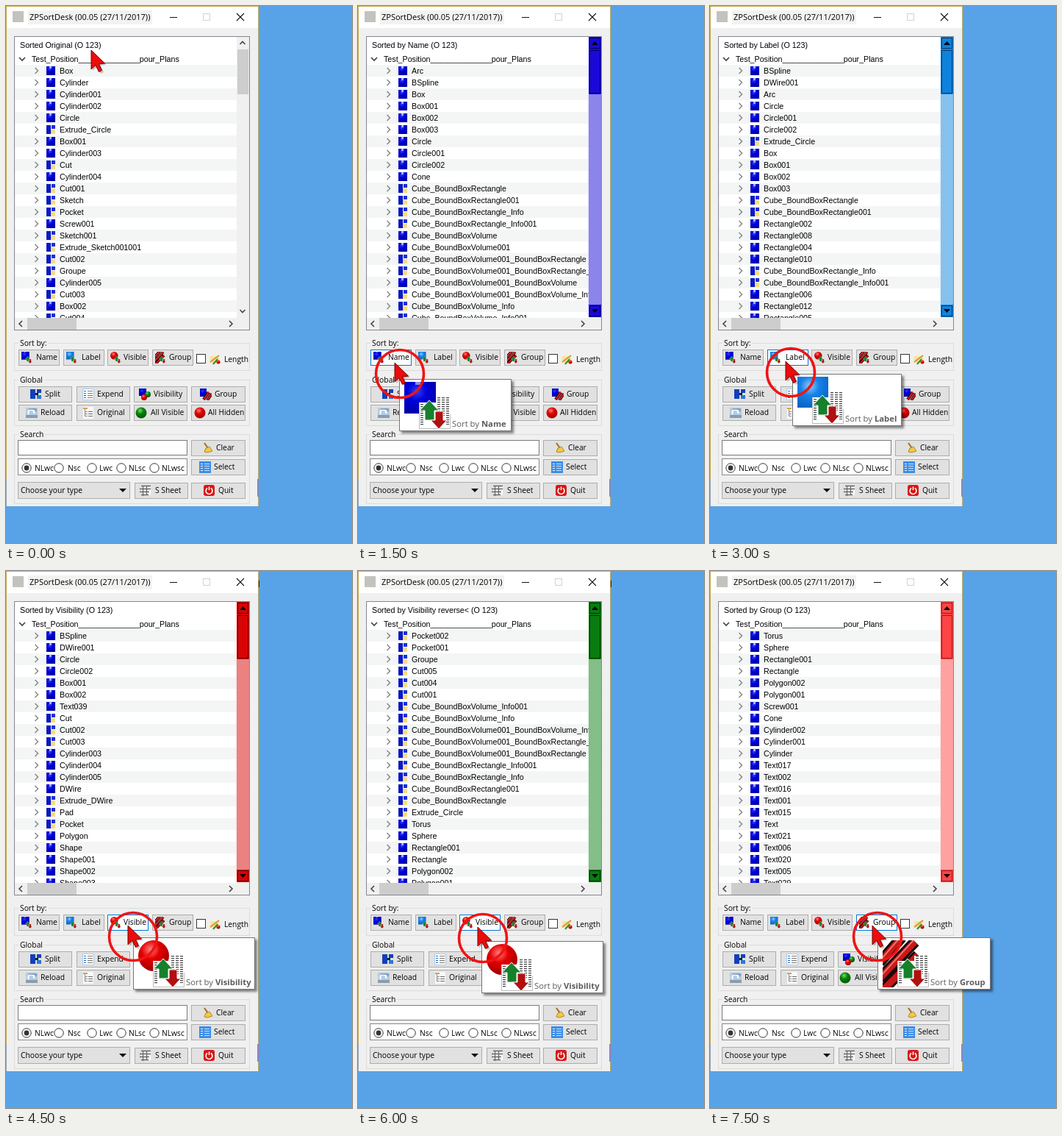
Animation, 471 px wide and 730 px high, one loop 8000 ms. Source, as an HTML page:

```html
<!DOCTYPE html>
<html lang="en">
<head>
<meta charset="utf-8">
<title>Sorting a tree</title>
<style>
html, body { margin: 0; width: 100%; height: 100%; overflow: hidden; background: #58a3e7; }
#stage { position: relative; width: 471px; height: 730px; overflow: hidden; }
#stage div, #stage span, #stage svg { position: absolute; box-sizing: border-box; }
span { white-space: pre; line-height: 16px; color: #000; font: 10.3px/16px "Open Sans", sans-serif; }
span.row { font: 10.7px/16px "Liberation Sans", Arial, sans-serif; }
span.title { font-size: 11px; }
span.legend { background: #eff0ef; padding: 0 2px; margin-left: -2px; }
span.tip { font-size: 11.3px; color: #5c5c5c; }
.scene { inset: 0; visibility: hidden; }
.list { left: 12px; top: 42px; width: 302px; height: 382px; overflow: hidden; background: #fff; }
</style>
</head>
<body>
<div id="stage"></div>
<script>
const STEP = 1500, LOOP = 8000;

const box = (x, y, w, h, fill, border, extra = '') =>
  `<div style="left:${x}px;top:${y}px;width:${w}px;height:${h}px;background:${fill};${border ? `border:1px solid ${border};` : ''}${extra}"></div>`;
const text = (x, middle, str, kind = '') =>
  `<span class="${kind}" style="left:${x}px;top:${middle - 8}px">${str}</span>`;
const svg = (x, y, w, h, body, view = `0 0 ${w} ${h}`) =>
  `<svg style="left:${x}px;top:${y}px" width="${w}" height="${h}" viewBox="${view}">${body}</svg>`;
const rect = (x, y, w, h, fill) => `<rect x="${x}" y="${y}" width="${w}" height="${h}" fill="${fill}"/>`;
const path = (d, stroke, width = 1, fill = 'none') =>
  `<path d="${d}" fill="${fill}" stroke="${stroke}" stroke-width="${width}"/>`;
const ball = (x, y, r, fill) => `<circle cx="${x}" cy="${y}" r="${r}" fill="url(#${fill})"/>`;
const lines = (x, y, w, count, gap, color) =>
  path(Array.from({ length: count }, (_, i) => `M${x} ${y + i * gap}h${w}`).join(''), color);

const radial = (id, light, main, dark) =>
  `<radialGradient id="${id}" cx=".4" cy=".3" r=".75"><stop stop-color="${light}"/><stop offset=".4" stop-color="${main}"/><stop offset="1" stop-color="${dark}"/></radialGradient>`;
const gradients = svg(0, 0, 1, 1, '<defs>' +
  radial('blue', '#3040f0', '#0000dc', '#0000a0') +
  radial('sky', '#90ccff', '#1683e8', '#0860c0') +
  radial('red', '#ff8080', '#e40000', '#960000') +
  radial('green', '#70e070', '#088408', '#045004') + '</defs>');

// 64-unit emblems shared by buttons and tooltips
const chain = rect(0, 0, 44, 64, '#fff') +
  path('M-4 30L26 -4M-4 52L44 2M0 68L48 20', '#1c0808', 15) +
  path('M-4 30L26 -4M-4 52L44 2M0 68L48 20', '#c81818', 9) +
  path('M-4 28L24 -4M-4 50L42 0', '#f07070', 2);
const emblems = {
  cube: rect(0, 0, 43, 43, 'url(#blue)') + rect(15, 0, 7, 4, '#8890f4'),
  label: rect(0, 0, 42, 42, 'url(#sky)'),
  ball: ball(21, 21, 21, 'red'),
  chain,
};
const sortEmblem = (kind, x, y, size) => {
  const sheet = size > 20
    ? rect(20, 28, 43, 36, '#fff') + rect(43, 21, 19, 36, '#fff') +
      path('M20.5 28.5V63.5H62.5V44', '#bbb') +
      '<path d="M47 21V46M53 21V46M59 21V58M24 30V60" stroke="#444" stroke-width="4" stroke-dasharray="1.2 1.8" fill="none"/>'
    : '';
  const up = 'M34 25L47 39H41V52H28V39H21Z', down = 'M47 64L58 52H53V40H42V52H36Z';
  return svg(x, y, size, size,
    emblems[kind] + sheet + path(up, '#fff', 1, '#16802c') + path(down, '#fff', 1, '#b01010'), '0 0 64 64');
};

// 16-unit button icons
const tree = (mark) => rect(1, 0, 14, 16, '#fafafa') + rect(1, 1, 6, 2, mark) +
  path('M3.5 3V13M3.5 6.5H7M3.5 9.5H7M3.5 12.5H7', '#888') + lines(8, 6.5, 6, 3, 3, '#666');
const icons = {
  split: rect(0, 1, 7, 13, '#1040b8') + rect(9, 1, 6, 5, '#1040b8') + rect(9, 9, 6, 5, '#2878d8') + rect(7, 6, 4, 3, '#123'),
  expend: rect(0, 0, 16, 16, '#fff') + path('M.5 .5H15.5V15.5H.5Z', '#a8c8e8') + lines(2, 3.5, 3, 4, 3, '#1868d0') + lines(7, 3.5, 7, 4, 3, '#777'),
  visibility: rect(0, 0, 10, 10, 'url(#blue)') + ball(12, 8, 4, 'green') + ball(7, 12, 4, 'red'),
  group: rect(0, 0, 9, 11, 'url(#blue)') + path('M5 15L12 5M10 16L16 7', '#300', 4) + path('M5 15L12 5M10 16L16 7', '#d82020', 2),
  reload: rect(0, 1, 16, 14, '#b4cbe0') + rect(0, 11, 16, 4, '#8a9cae') + path('M4 10A4 4 0 1 1 11 9', '#fff', 2) + path('M4 3H14V6', '#4a78a8'),
  original: tree('#d8a048'),
  shown: ball(8, 8, 7.5, 'green'),
  hidden: ball(8, 8, 7.5, 'red'),
  broom: path('M4 1L9 8', '#a06820', 2) + path('M6 8L11 6L15 12L8 14L4 13Z', '#b88820', 1, '#f0c848'),
  select: rect(0, 0, 16, 16, '#3a8ee8') + lines(2, 3.5, 3, 4, 3, '#fff') + lines(7, 3.5, 7, 4, 3, '#c8e4ff'),
  sheet: rect(2, 1, 13, 13, '#fff') + path('M2 1.5H15M0 5.5H15M0 9.5H13M2 13.5H12M4.5 1V15M9.5 1V14', '#666', 1.3),
  power: '<rect width="15" height="15" rx="3" fill="#d81818"/>' + path('M5 4.5A4.4 4.4 0 1 0 10 4.5M7.5 2.5V7', '#fff', 1.6),
  length: rect(1, 4, 12, 9, '#f4e4a0') + path('M1 12L13 3', '#d89828', 2) + path('M5 15L11 8', '#28903c', 2) + ball(12, 12, 2.5, 'red'),
};
const icon = (name, x, y) => svg(x, y, 16, 16, icons[name]);

const button = (x, y, w, h, label, textX, picture, hot) =>
  box(x, y, w, h, hot ? '#fcfdfe' : '#e1e1e1', hot ? '#0078d7' : '#adadad') + picture +
  text(textX, y + Math.floor(h / 2) - 1, label);
const sorters = [
  ['Name', 17, 41, 'cube'], ['Label', 78, 103, 'label'],
  ['Visible', 138, 160, 'ball'], ['Group', 199, 222, 'chain'],
];
const sortButton = ([label, x, textX, kind], hot) =>
  button(x, 467, 56, 22, label, textX, sortEmblem(kind, x + 4, 470, 16), hot);
const iconButton = ([label, x, y, textX, name, iconX]) =>
  button(x, y, x === 252 ? 74 : 73, 22, label, textX, icon(name, iconX, y + 3));
const frame = (y, h, label) => box(11, y, 321, h, 'none', '#dcdcdc') + text(19, y, label, 'legend');
const radio = ([label, x, textX], i) =>
  svg(x - 7, 621, 14, 14, '<circle cx="7" cy="7" r="6.2" fill="#fff" stroke="#333"/>' +
    (i ? '' : '<circle cx="7" cy="7" r="3.4" fill="#333"/>')) + text(textX, 628, label);

const windowLayer = () =>
  box(0, 0, 344, 680, '#eff0ef', '#d0ae58', 'border-bottom:0;') +
  box(0, 642, 1, 38, '#9aa4b4') + box(342, 643, 2, 24, '#8c88bc') +
  box(1, 1, 342, 29, '#fff') + box(30, 6, 169, 19, '#f2f2f1') +
  box(9, 7, 15, 15, '#c4c2bc') + text(32, 15, 'ZPSortDesk (00.05 (27/11/2017))', 'title') +
  box(223, 15, 10, 1, '#111') + box(268, 10, 10, 10, 'none', '#d2d2d2') +
  svg(313, 9, 12, 12, path('M1 1L11 11M11 1L1 11', '#111', 1.1)) +
  box(11, 41, 321, 400, '#f0f0f0', '#828790') +
  box(29, 424, 67, 16, '#cdcdcd') +
  svg(16, 427, 8, 10, path('M6 1L2 5L6 9', '#444', 1.6)) +
  svg(302, 427, 8, 10, path('M2 1L6 5L2 9', '#444', 1.6)) +
  frame(458, 38, 'Sort by:') + sorters.map(s => sortButton(s)).join('') +
  box(259, 473, 13, 13, '#fff', '#333') + icon('length', 277, 472) + text(297, 480, 'Length') +
  frame(508, 63, 'Global') + frame(582, 95, 'Search') +
  [
    ['Split', 17, 517, 53, 'split', 33], ['Expend', 96, 517, 124, 'expend', 104],
    ['Visibility', 174, 517, 201, 'visibility', 181], ['Group', 252, 517, 284, 'group', 264],
    ['Reload', 17, 542, 47, 'reload', 27], ['Original', 96, 542, 124, 'original', 104],
    ['All Visible', 174, 542, 197, 'shown', 176], ['All Hidden', 252, 542, 275, 'hidden', 256],
    ['Clear', 252, 590, 286, 'broom', 266], ['Select', 252, 616, 283, 'select', 263],
    ['S Sheet', 175, 648, 203, 'sheet', 182], ['Quit', 252, 648, 289, 'power', 269],
  ].map(iconButton).join('') +
  box(16, 590, 231, 21, '#fff', '#7a7a7a') + box(16, 615, 231, 23, '#fff', '#8a8a8a') +
  [['NLwc', 28, 39], ['Nsc', 72, 84], ['Lwc', 117, 127], ['NLsc', 157, 167], ['NLwsc', 202, 212]].map(radio).join('') +
  box(16, 647, 153, 23, '#e1e1e1', '#adadad') + text(20, 658, 'Choose your type') +
  svg(154, 656, 10, 5, path('M0 0H10L5 5Z', 'none', 0, '#111'));

const cubeIcon = rect(0, 0, 12, 12, 'url(#blue)') + rect(4, 0, 3, 3, '#9cacff');
const groupIcon = rect(0, 0, 12, 12, '#fff') + rect(0, 0, 6, 12, '#0818c8') + rect(7, 0, 5, 5, '#1830d8') + rect(6, 6, 6, 6, '#f6dc84');

// A leading * marks an item that contains others
const treeRow = (item, i) => {
  const middle = 46 + i * 16, grouped = item[0] === '*';
  return box(0, middle - 8, 302, 16, i % 2 ? '#fff' : '#f4f6f5') +
    svg(26, middle - 5, 8, 10, path('M1.5 1L5.5 5L1.5 9', '#888', 1.5)) +
    svg(43, middle - 6, 12, 12, grouped ? groupIcon : cubeIcon) +
    text(61, middle, grouped ? item.slice(1) : item, 'row');
};
const treeList = (heading, items) => `<div class="list">` +
  text(7, 11, heading, 'row') + svg(5, 26, 10, 8, path('M1 2L5 6L9 2', '#404040', 1.6)) +
  text(23, 30, 'Test_Position' + '_'.repeat(14) + 'pour_Plans', 'row') +
  items.split(' ').map(treeRow).join('') + '</div>';

const scrollbar = (color, edge) => {
  if (!color) return box(315, 59, 15, 61, '#cdcdcd') +
    svg(317, 46, 10, 8, path('M1.5 6L5 2.5L8.5 6', '#444', 1.6)) +
    svg(317, 411, 10, 8, path('M1.5 2L5 5.5L8.5 2', '#444', 1.6));
  const raised = (y, h) => box(314, y, 17, h, color, color, `box-shadow:inset 0 0 0 1px ${edge};`);
  const arrow = (y, d) => raised(y, 17) + svg(318, y + 6, 9, 5, path(d, 'none', 0, '#000'));
  return box(314, 42, 17, 381, `repeating-conic-gradient(${color} 0 25%,#fff 0 50%) 0 0/2px 2px`) +
    arrow(42, 'M0 5L4.5 0L9 5Z') + raised(59, 61) + arrow(406, 'M0 0L4.5 5L9 0Z');
};

const tooltip = (x, y, w, kind, word) =>
  box(x, y, w, 71, '#fff', '#767676', 'box-shadow:3px 3px 3px #0007;') +
  sortEmblem(kind, x + 7, y + 4, 64) + text(x + 72, y + 61, `Sort by <b>${word}</b>`, 'tip');
const ring = (x, y) => svg(x - 30, y - 22, 74, 74, '<circle cx="37" cy="37" r="32.5" fill="none" stroke="#f01414" stroke-width="3.6"/>');
const pointer = (x, y) => svg(x - 1, y - 1, 26, 36,
  path('M3 3V29L9 24L14 33L18 31L14 22L22 21Z', 'none', 0, '#0003') +
  path('M1 1V27L7 21.5L11.5 30.5L15.5 28.5L11.5 20L19.5 19Z', '#700', 1, '#ec0c0c'));

const scenes = [
  { heading: 'Original', tip: [116, 60],
    items: 'Box Cylinder Cylinder001 Cylinder002 Circle *Extrude_Circle Box001 Cylinder003 *Cut Cylinder004 *Cut001 *Sketch *Pocket Screw001 *Sketch001 *Extrude_Sketch001001 *Cut002 *Groupe Cylinder005 *Cut003 Box002 *Cut004' },
  { heading: 'by Name', tip: [50, 485], bar: ['#1a08d8', '#000060'], sorter: 0, hint: [56, 507, 153, 'cube', 'Name'],
    items: 'Arc BSpline Box Box001 Box002 Box003 Circle Circle001 Circle002 Cone *Cube_~Rectangle *Cube_~Rectangle001 *Cube_~Rectangle_Info *Cube_~Rectangle_Info001 Cube_~Volume Cube_~Volume001 *Cube_~Volume001_~Rectangle *Cube_~Volume001_~Rectangle_Info Cube_~Volume001_~Volume *Cube_~Volume001_~Volume_Info *Cube_~Volume_Info *Cube_~Volume_Info001' },
  { heading: 'by Label', tip: [103, 483], bar: ['#0e82dc', '#043c70'], sorter: 1, hint: [112, 500, 149, 'label', 'Label'],
    items: 'BSpline DWire001 Arc Circle Circle001 Circle002 *Extrude_Circle Box Box001 Box002 Box003 *Cube_~Rectangle *Cube_~Rectangle001 Rectangle002 Rectangle008 Rectangle004 Rectangle010 *Cube_~Rectangle_Info *Cube_~Rectangle_Info001 Rectangle006 Rectangle012 Rectangle005' },
  { heading: 'by Visibility', tip: [166, 482], bar: ['#d80404', '#600000'], sorter: 2, hint: [173, 498, 166, 'ball', 'Visibility'], sliver: true,
    items: 'BSpline DWire001 Circle Circle002 Box001 Box002 Text039 *Cut *Cut002 *Cut003 Cylinder003 Cylinder004 Cylinder005 DWire *Extrude_DWire *Pad *Pocket Polygon Shape Shape001 Shape002 Shape003' },
  { heading: 'by Visibility reverse&lt;', tip: [163, 484], bar: ['#087c10', '#003804'], sorter: 2, hint: [168, 503, 166, 'ball', 'Visibility'], sliver: true,
    items: '*Pocket002 *Pocket001 *Groupe *Cut005 *Cut004 *Cut001 *Cube_~Volume_Info001 *Cube_~Volume_Info *Cube_~Volume001_~Volume_Info *Cube_~Volume001_~Rectangle_Info *Cube_~Volume001_~Rectangle *Cube_~Rectangle_Info001 *Cube_~Rectangle_Info *Cube_~Rectangle001 *Cube_~Rectangle *Extrude_Circle Torus Sphere Rectangle001 Rectangle Polygon002 Polygon001' },
  { heading: 'by Group', tip: [221, 482], bar: ['#ff4444', '#a01818'], sorter: 3, hint: [228, 498, 154, 'chain', 'Group'],
    items: 'Torus Sphere Rectangle001 Rectangle Polygon002 Polygon001 Screw001 Cone Cylinder002 Cylinder001 Cylinder Text017 Text002 Text016 Text001 Text015 Text Text021 Text006 Text020 Text005 Text029' },
];

const sceneLayer = ({ heading, items, tip, bar = [], sorter, hint, sliver }) => '<div class="scene">' +
  treeList(`Sorted ${heading} (O 123)`, items.replaceAll('~', 'BoundBox')) + scrollbar(...bar) +
  (sliver ? box(344, 13, 1, 9, '#222') + box(344, 643, 1, 14, '#8c88bc') : '') +
  (hint ? sortButton(sorters[sorter], true) + tooltip(...hint) + ring(...tip) : '') +
  pointer(...tip) + '</div>';

const stage = document.getElementById('stage');
stage.innerHTML = gradients + windowLayer() + scenes.map(sceneLayer).join('');
const layers = stage.querySelectorAll('.scene');

const start = performance.now();
function draw(now) {
  const current = Math.floor(Math.max(0, now - start) % LOOP / STEP);
  layers.forEach((layer, i) => { layer.style.visibility = i === current ? 'visible' : 'hidden'; });
  requestAnimationFrame(draw);
}
draw(start);
</script>
</body>
</html>
```
